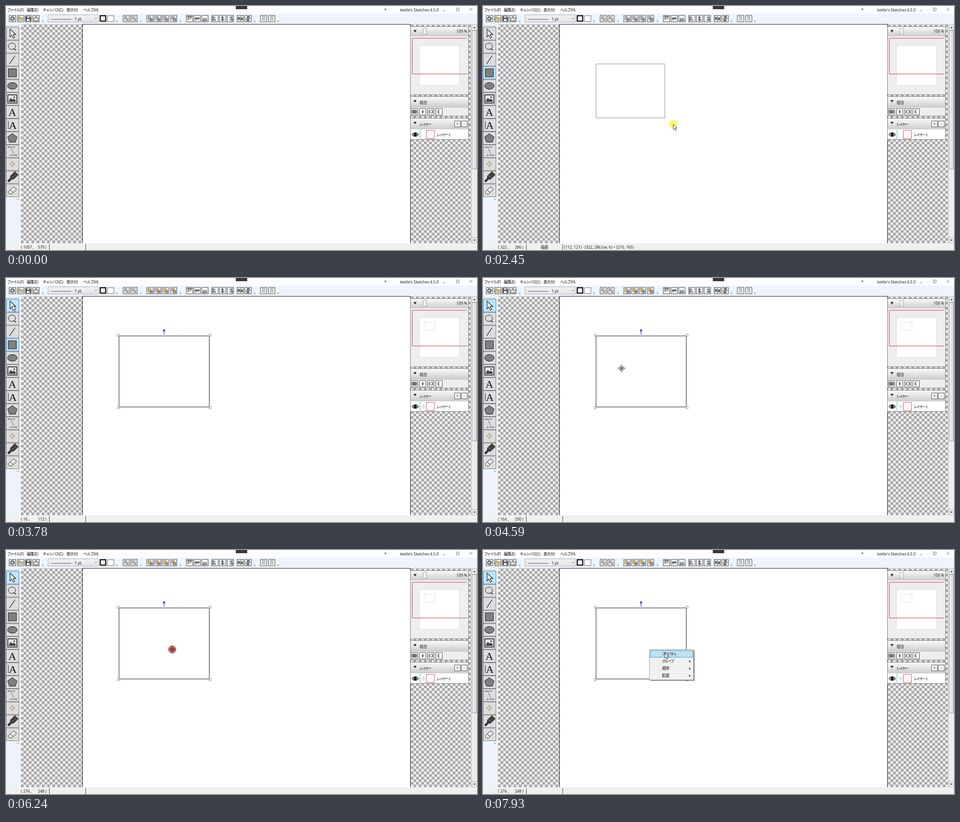
An HTML page for the animation above (8000 ms loop, 1037 px wide and 540 px high).

```html
<!DOCTYPE html>
<html lang="ja">
<head>
<meta charset="utf-8">
<style>
html, body { margin: 0; width: 100%; height: 100%; overflow: hidden; background: #fff; }
svg { display: block; width: 1037px; height: 540px; }
text { font: 8.4px "Open Sans", "Noto Sans", "Noto Sans CJK JP", sans-serif; fill: #111; white-space: pre; }
.jp { font: 8.6px "Noto Sans CJK JP", "Noto Sans CJK", sans-serif; font-feature-settings: "palt"; letter-spacing: -.6px; }
.kana { font-size: 8.2px; letter-spacing: -1.1px; }
.big { font: 24px "Liberation Serif", serif; }
</style>
</head>
<body>
<svg id="stage" viewBox="0 0 1037 540"></svg>
<script>
const svg = document.getElementById('stage');
const LOOP = 8000, SCALE = 0.722, LEFT = 168, TOP = 41;

const rect = (x, y, w, h, fill, stroke = 'none', more = '') =>
  `<rect x="${x}" y="${y}" width="${w}" height="${h}" fill="${fill}" stroke="${stroke}" ${more}/>`;
const path = (d, fill = 'none', stroke = '#111', more = '') =>
  `<path d="${d}" fill="${fill}" stroke="${stroke}" ${more}/>`;
const text = (x, y, s, more = '') => `<text x="${x}" y="${y}" ${more}>${s}</text>`;
const jp = (x, y, s) => text(x, y, s, 'class="jp"');
const kana = (x, y, s) => text(x, y, s, 'class="jp kana"');
const at = (x, y, body, more = '') => `<g transform="translate(${x} ${y})" ${more}>${body}</g>`;
const ellipse = (x, y, rx, ry, fill, stroke = '#111') =>
  `<ellipse cx="${x}" cy="${y}" rx="${rx}" ry="${ry}" fill="${fill}" stroke="${stroke}"/>`;

// Top bar
const iconBox = (x, body) => at(x, 28, rect(-7, -7, 14, 14, '#fff', '#333') + body);
const overflow = x => path(`M${x - 1.5} 32.5h3M${x - 1.5} 34l1.5 1.5l1.5-1.5`, 'none', '#444', 'stroke-width=".7"');

function order(x, goldInFront) {
  const gold = rect(-4.5, -4.5, 6, 6, 'var(--order)', '#555', 'stroke-width=".8"');
  const gray = rect(-1, -1, 6, 6, '#999', '#555', 'stroke-width=".8"');
  return iconBox(x, goldInFront ? gray + gold : gold + gray);
}

function align(x, vertical, offset) {
  const bars = rect(-4, -4 + offset, 3, 6, '#aaa', '#555', 'stroke-width=".7"') +
    rect(1, -4 + offset, 3, 4, '#aaa', '#555', 'stroke-width=".7"') +
    path(`M-5.5 ${-5 + offset * 3}h11`);
  return iconBox(x, vertical ? `<g transform="rotate(-90)">${bars}</g>` : bars);
}

function topBar() {
  const group = rect(-4.5, -4.5, 9, 9, 'none', '#777', 'stroke-dasharray="2 1.5"') +
    rect(-3.5, -3.5, 4, 4, '#ccc', '#777') + rect(0, 0, 4, 4, '#ccc', '#777');
  const spread = path('M0-5.5v11') + rect(-5, -3, 3, 5, '#888', '#333') + rect(2, -2, 3, 5, '#888', '#333');
  const fit = rect(-3, -4.5, 6, 8, '#ccc', '#999');
  return rect(0, 0, 1037, 17, '#fdfdfe') + rect(0, 17, 1037, 23, '#edf4fc') +
    rect(506, 0, 25, 7, '#333') + path('M511 3.5h15', 'none', '#888', 'stroke-dasharray="1 3"') +
    jp(3, 11.5, 'ファイル(F)') + jp(46, 11.5, '編集(E)') + jp(81, 11.5, 'キャンバス(C)') +
    jp(133, 11.5, '表示(V)') + jp(170, 11.5, 'ヘルプ(H)') +
    text(833, 12, '*') + text(868, 11.5, "kettle's Sketches 4.5.0") +
    path('M962 10.5h5M991.5 4.5h6v6h-6zM1020.5 4.5l6 6m0-6l-6 6', 'none', '#555', 'stroke-width=".8"') +
    iconBox(14, ellipse(0, 0, 3, 3, 'none') +
      '<circle r="4.5" fill="none" stroke="#111" stroke-width="2" stroke-dasharray="1.8 1.73"/>') +
    iconBox(32, path('M-5 4v-8h4l1 2h4v6z', '#e9c56c', '#665') + path('M-5 4l3-4h8l-2 4z', '#f8dc92', '#665', 'stroke-width=".7"')) +
    iconBox(49, path('M-5-5h8l2 2v8h-10z', '#555') + rect(-2.5, -5, 5, 3, '#fff') + rect(-3, 1, 6, 4, '#fff')) +
    iconBox(66, path('M-2-2h-2.500v7h9v-7h-2.500M0 2v-7m-2 2l2-2l2 2')) + overflow(81) +
    rect(92.5, 19.5, 111, 16, 'url(#combo)', '#b0b0b0') + path('M100 29.500h44', 'none', '#333', 'stroke-width=".8"') +
    text(151, 32, '1 pt') + path('M196 26.500l2 2l2-2', 'none', '#444') +
    rect(207.5, 21.5, 12, 12, '#fff', '#111', 'stroke-width="2.500"') + rect(223.5, 21.5, 14, 13, '#fff', '#666') + overflow(244) +
    iconBox(265, group) + iconBox(282, group) + overflow(297) +
    order(317, true) + order(334, true) + order(351, true) + order(369, false) + overflow(384) +
    align(404, false, 0) + align(421, false, 1.5) + align(438, false, 3) +
    align(460, true, 0) + align(477, true, 1.5) + align(494, true, 3) +
    iconBox(516, spread) + iconBox(533, `<g transform="rotate(90)">${spread}</g>`) + overflow(547) +
    iconBox(567, fit) + iconBox(585, fit) + overflow(599);
}

// Left tools; each icon is drawn around its own centre
const tools = [
  path('M-5-10v17l4-4l3 7l3-1.500l-3-6.500h5.500z', '#fff', '#111', 'stroke-width="1.200"'),
  ellipse(-1, -1, 8, 7, 'none') + path('M3 4l5 4', 'none', '#111', 'stroke-width="1.500"'),
  path('M-6 9L6-9', 'none', '#111', 'stroke-width="1.300"'),
  rect(-9, -9, 18, 18, '#808080', '#111'),
  ellipse(0, 0, 10.5, 7.5, '#808080'),
  rect(-10, -9, 20, 18, '#eee', '#444', 'stroke-width="2.200"') + path('M-7 6v-3l4-5l3 4l3-2l4 3v3z', '#444', '#444') + ellipse(4, -4, 1.5, 1.5, '#444', '#444'),
  text(0, 8, 'A', 'class="big" text-anchor="middle"'),
  text(1, 8, 'A', 'class="big" text-anchor="middle"') + path('M-9-9v18'),
  path('M0-10L10.500-2.500L6.500 9H-6.500L-10.500-2.500z', '#808080'),
  path('M-8-9H4M-4 9H9M-8-9C4-9-4 9 9 9', 'none', '#444', 'stroke-width=".8"') +
    [[-9, -9], [4, -9], [-4, 9], [9, 9]].map(([x, y]) => rect(x - 1, y - 1, 2, 2, '#333')).join(''),
  path('M0-6L1.500-1.500L6 0L1.500 1.500L0 6L-1.500 1.500L-6 0L-1.500-1.500z', '#fff8a0', '#665', 'stroke-width=".8"'),
  '<g transform="rotate(45)">' + rect(-5, -13, 10, 9, '#444', '#222') + rect(-5, -3, 10, 3, '#777', '#222') +
    path('M-5 1h10l-3 3v8q-2 3-4 0v-8z', '#444', '#222') + '</g>',
  path('M3-8l6 6L-2 8h-4l-4-4z', '#eee') + path('M-5-1l7 6')
];
const toolY = i => 61.2 + i * 28.9;

const leftBar = () => rect(0, 40, 33, 485, '#edf3fb') +
  path('M2 44.500h26', 'none', '#555', 'stroke-dasharray="1.500 1.500"') +
  tools.map((icon, i) => rect(.5, toolY(i) - 14, 28, 28, '#ddd', '#707070', `id="tool${i}"`) + at(14, toolY(i), icon)).join('') +
  path('M24 426l1.500 1.500l-1.500 1.500m2.500-3l1.500 1.500l-1.500 1.500', 'none', '#444', 'stroke-width=".7"');

// Right panels
const panel = (y, h, head, body) => rect(890.5, y + .5, 128, h - 1, body, '#777') +
  rect(891, y + 1, 127, head, 'url(#head)') + path(`M897 ${y + 8.5}h7l-3.500 4.500z`, '#111', 'none');

function panels() {
  const merge = [
    ellipse(-1.5, 0, 4, 4, '#777', '#555') + ellipse(1.5, 0, 4, 4, '#777', '#777'),
    path('M0-4q3 4 0 8q-3-4 0-8', '#777', '#555'),
    path('M-1-4a4 4 0 0 0 0 8q-3-4 0-8M1-4a4 4 0 0 1 0 8q3-4 0-8', '#999', '#555', 'stroke-width=".7"'),
    path('M1-4a4 4 0 1 0 0 8q-4-4 0-8', '#777', '#555', 'stroke-width=".7"')
  ];
  return panel(45, 152, 21, '#eee') + rect(918.5, 49.5, 7, 12, '#f4f4f4', '#aaa') + text(992, 58.5, '100 %') +
    rect(910.5, 87.5, 88, 88, '#fff', '#ddd') +
    rect(920.5, 98.5, 24, 18, 'none', '#aaa', 'id="mini" stroke-width=".8" stroke-dasharray="1 1"') +
    path('M1015 71.500H894.500V150.500H1015', 'none', '#e02828') +
    panel(200, 44, 24, '#eee') + jp(911, 216.5, '結合') +
    merge.map((m, i) => at(899.5 + i * 18, 234, rect(-7, -7, 14, 14, '#fff', '#444') + m)).join('') +
    panel(248, 48, 24, '#fff') + kana(911, 264.5, 'レイヤー') +
    rect(987.5, 254.5, 13, 13, '#f4f4f4', '#555') + rect(1002.5, 254.5, 13, 13, '#f4f4f4', '#555') +
    text(991.5, 264, '+') + text(1007.5, 264, '-') +
    path('M894 284.500q7-8 14 0q-7 8-14 0z', '#fff', '#111', 'stroke-width="1.300"') + ellipse(901, 284.5, 3, 3, '#111') +
    rect(910, 274, 3, 21, '#b4e6e2') + rect(925.5, 275.5, 18, 18, '#fff', '#e04444') +
    path('M919 280.500v8l4-4z', '#fff', '#999', 'id="expand" stroke-width=".8"') + kana(949, 288, 'レイヤー1');
}

const scrollBar = () => rect(1025, 40, 12, 485, '#ececec') +
  [41.5, 512.5].map(y => rect(1026.5, y, 10, 12, '#eee', '#bbb')).join('') +
  path('M1029 49h5l-2.500-3zM1029 517h5l-2.500 3z', '#222', 'none') +
  rect(1026.5, 54.5, 10, 306, 'url(#thumb)', '#999');

const statusBar = () => rect(0, 525, 1037, 15, '#f0f0f0') + path('M95.500 527v13M175.500 527v13', 'none', '#333') +
  text(33, 537, '(') + text(38, 537, '', 'id="posX"') + text(84.5, 537, '', 'id="posY" text-anchor="end"') + text(86.5, 537, ')') +
  `<g id="drawing">${jp(127, 537, '描画')}${text(179, 537, '', 'id="extent"')}</g>`;

// Drawn box, context menu, pointer
const BOX = { x: 249, y: 128, right: 447.6, bottom: 285.2 };

const shape = () => rect(248.9, 128.2, 0, 0, '#fff', '#888', 'id="box"') + '<g id="handles">' +
  [247, 449].map(x => [126, 287].map(y => rect(x - 2, y - 2, 4.5, 4.5, '#fff', '#777', 'stroke-width=".8"')).join('')).join('') +
  path('M348 118v7.500', 'none', '#4848c8', 'stroke-width="1.400"') + ellipse(348, 116, 2.5, 2.5, '#4848c8', 'none') + '</g>';

const menu = () => '<g id="menu">' + rect(369, 223, 97, 67, '#000', 'none', 'opacity=".18"') + rect(368, 222, 97.5, 67, '#000', 'none', 'opacity=".4"') +
  rect(366.5, 220.5, 97, 67, '#f1f1f1', '#999') + path('M388.500 222v64', 'none', '#e2e2e2') +
  rect(368.5, 222.5, 93, 15, '#c2e0ee', '#26a0da', 'id="hover"') +
  kana(394, 233.3, 'プロパティ') + kana(394, 249.3, 'グループ') + jp(394, 265.3, '順序') + jp(394, 281.3, '配置') +
  [244, 260, 276].map(y => path(`M454 ${y}v5l3-2.500z`, '#111', 'none')).join('') + '</g>';

const arm = 'M-1-1v-3h-2l3-4l3 4h-2v3z';
const pointer = () => '<g id="pointer"><circle id="halo" r="9"/>' +
  path('M0 0v11.500l2.600-2.500l2 4.700l2-.9l-2-4.600h3.800z', '#fff', '#111', 'id="arrow" stroke-width=".8"') +
  `<g id="move" stroke-width=".9">${[0, 90, 180, 270].map(a =>
    `<path d="${arm}" transform="rotate(${a})" stroke="#222"/>`).join('')}</g></g>`;

const gradient = (id, a, b, across = 0) => `<linearGradient id="${id}" x2="${across}" y2="${1 - across}">` +
  `<stop stop-color="${a}"/><stop offset="1" stop-color="${b}"/></linearGradient>`;
const CELL = 8 * 1037 / 1440;
svg.innerHTML = '<defs>' + gradient('combo', '#f2f2f2', '#e4e4e4') + gradient('head', '#fafafa', '#cbcbcb') +
  gradient('thumb', '#f6f6f6', '#cfcfcf', 1) +
  `<pattern id="checker" x="33" y="41" width="${2 * CELL}" height="${2 * CELL}" patternUnits="userSpaceOnUse">` +
  rect(0, 0, 2 * CELL, 2 * CELL, '#f0f0f0') + rect(CELL, 0, CELL, CELL, '#a6a6a6') + rect(0, CELL, CELL, CELL, '#a6a6a6') + '</pattern></defs>' +
  topBar() + rect(33, 40, 992, 485, 'url(#checker)') + path('M168.500 525V40.500H890.500V525', '#fff', '#111') +
  shape() + leftBar() + panels() + scrollBar() + statusBar() + menu() + pointer();

const part = {};
svg.querySelectorAll('[id]').forEach(e => part[e.id] = e);
const show = (id, on) => part[id].style.display = on ? '' : 'none';

// Pointer path: time, x, y
const keys = [
  [490, 922, 538], [560, 895, 459], [910, 500, 290], [1120, 173.8, 160], [1121, 160, 159], [1260, 14, 148],
  [1470, 13, 148], [1600, 13, 148], [2090, 248, 131], [2160, 249, 128], [2420, 400.5, 247.5], [2450, 419, 262],
  [2660, 447.6, 285.2], [2910, 447.6, 285.2], [3050, 448.1, 267], [3080, 446, 264], [3430, 200, 130], [3700, 14, 60],
  [3900, 14, 61], [4180, 11, 66], [4380, 11, 66], [4560, 286.4, 185.4], [4590, 305, 200], [4800, 360, 219],
  [5100, 369, 221], [5370, 366, 220], [6960, 366, 220], [7300, 386, 226], [7730, 400.5, 228]
];

function pointerAt(t) {
  const i = keys.findIndex(k => k[0] > t);
  if (i === 0) return keys[0].slice(1);
  if (i < 0) return keys[keys.length - 1].slice(1);
  const [t0, x0, y0] = keys[i - 1], [t1, x1, y1] = keys[i], f = (t - t0) / (t1 - t0);
  return [x0 + (x1 - x0) * f, y0 + (y1 - y0) * f];
}

// The application trails the pointer, remembers the last point over the page
// and stops following once the menu is open
const LAG = 30, STEP = 10, MENU = 6400;
function pagePoint(t) {
  for (let s = Math.min(t, MENU) - LAG; s >= 490; s -= STEP) {
    const [x, y] = pointerAt(s);
    if (x > 173 && x < 896 && y < 525) return [x, y];
  }
  return [895, 459.1];
}
const toPage = ([x, y]) => [Math.round((x - LEFT) / SCALE), Math.round((y - TOP) / SCALE)];

const between = (t, a, b) => t >= a && t < b;

function render(t) {
  const [x, y] = pointerAt(t), last = pagePoint(t), [px, py] = toPage(last);
  const dragging = between(t, 2200, 2870), made = t >= 2870, menuOpen = t >= MENU;

  part.posX.textContent = px + ' ,';
  part.posY.textContent = py;
  show('drawing', dragging);
  part.extent.textContent = `(112, 121) - (${px}, ${py}) (w, h) = (${px - 112}, ${py - 121})`;

  show('box', dragging || made);
  const [right, bottom] = made ? [BOX.right, BOX.bottom] : last;
  part.box.setAttribute('width', Math.max(0, right - BOX.x));
  part.box.setAttribute('height', Math.max(0, bottom - BOX.y));
  part.box.setAttribute('stroke', made ? '#111' : '#888');
  ['handles', 'mini', 'expand'].forEach(id => show(id, made));
  svg.style.setProperty('--order', made ? '#f0bd58' : '#bbb');

  const active = { tool0: t >= 3700, tool3: between(t, 1250, 3900) };
  for (const id in active) {
    part[id].setAttribute('fill', active[id] ? '#bee6fd' : '#ddd');
    part[id].setAttribute('stroke', active[id] ? '#3c7fb1' : '#707070');
  }

  show('menu', menuOpen);
  part.menu.style.opacity = Math.min(1, (t - MENU) / 130);
  show('hover', x > 368 && y > 221);

  const rightClick = between(t, 6240, MENU);
  const leftClick = between(t, 1400, 1560) || between(t, 2160, 2800) || between(t, 3850, 4000);
  const moving = t >= 4380 && !menuOpen && x > BOX.x && y > BOX.y;
  show('pointer', t >= 490);
  part.pointer.setAttribute('transform', `translate(${x} ${y})`);
  show('halo', leftClick || rightClick);
  part.halo.setAttribute('fill', rightClick ? 'rgba(225,50,50,.65)' : 'rgba(250,236,0,.6)');
  show('arrow', !moving);
  show('move', moving);
  part.move.setAttribute('fill', rightClick ? '#e87878' : '#fff');
}

function tick() {
  render(Math.floor(performance.now() % LOOP / STEP) * STEP);
  requestAnimationFrame(tick);
}
tick();
</script>
</body>
</html>
```
